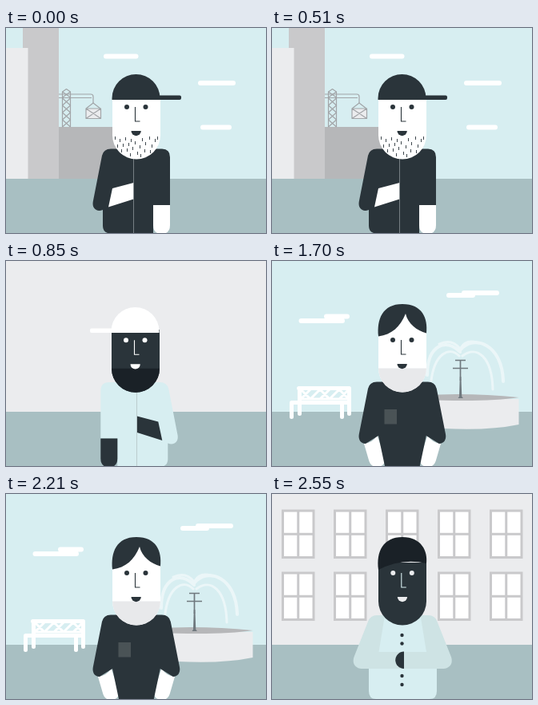
An HTML page for the animation above (3400 ms loop, 325 by 257 pixels).

```html
<!DOCTYPE html>
<html lang="en">
<head>
<meta charset="utf-8">
<title>Townspeople</title>
<style>
  html, body { margin: 0; width: 100%; height: 100%; overflow: hidden; background: #d7eef1; }
  svg { display: block; width: 100%; height: 100%; }

  .scene { visibility: hidden; animation: show 3.4s step-end infinite; }
  .scene:nth-of-type(2) { animation-delay: -2.55s; }
  .scene:nth-of-type(3) { animation-delay: -1.7s; }
  .scene:nth-of-type(4) { animation-delay: -.85s; }
  @keyframes show {
    0% { visibility: visible; }
    25%, 100% { visibility: hidden; }
  }

  .sky { fill: #d7eef1; }
  .wall { fill: #ebecee; }
  .ground { fill: #a8bfc2; }
  .dark { fill: #2a343a; }
  .black { fill: #1a2127; }
  .white { fill: #fff; }
  .grey { fill: #c9c9cb; }
  .shade { fill: #b6b7b9; }
  .sleeve { fill: #cee3e4; }
  .line { fill: none; stroke-linejoin: round; }
  .cloud { fill: none; stroke: #fff; stroke-width: 6; stroke-linecap: round; }
</style>
</head>
<body>
<svg viewBox="0 0 325 257" preserveAspectRatio="none">
  <defs>
    <path id="head" d="M133 86H193V134.500A30 30 0 0 1 133 134.500Z"/>
    <path id="beard" d="M133 134.500H193A30 30 0 0 1 133 134.500Z"/>
    <g id="face">
      <circle cx="151" cy="99" r="3"/>
      <circle cx="174.500" cy="99" r="3"/>
      <path d="M156.500 129H168.800A6.150 6.150 0 0 1 156.500 129Z"/>
      <path class="line" d="M161.500 99V117H167.500" stroke="currentColor" stroke-width="1.100" style="stroke-linejoin:miter"/>
    </g>
    <g id="cap">
      <path d="M132.500 90V88A30 30 0 0 1 192.500 88V90Z"/>
      <rect x="180" y="84.500" width="39" height="5.500" rx="2"/>
    </g>
    <g id="jacket">
      <path d="M131 151.500H195Q205 151.500 205 162V222H184V257H127Q121 255 121 248V228C113 231 107.500 226 108.700 218L120 160Q122 151.500 131 151.500Z"/>
    </g>
    <path id="low-hand" d="M184 222H205V247Q205 258 194.500 258T184 247Z"/>
    <path id="tucked-hand" d="M133 201L159.500 194V214.500L128 224.500Z"/>
    <path id="half-sleeve" d="M163 151.500H131Q122 151.500 120 160L108.800 217C107.500 224 111 229 117 229L133 219L141 257H163Z"/>
    <path id="side-hand" d="M115 229Q126 228 131.500 218.500L140.500 246Q143 257 132 258Q123 259 120.500 248Z"/>
    <path id="folded-arm" d="M141 152H131Q123 152 120 160L103 203C99 213 105 219 113 219H163.500V198H133.500Z"/>
    <g id="window">
      <rect x="1.500" y="1.500" width="38.500" height="58.500" fill="#fff" stroke="#c9c9cb" stroke-width="3"/>
      <path d="M20.750 1V61M1 30.750H41" stroke="#c9c9cb" stroke-width="3"/>
    </g>
    <g id="window-row">
      <use href="#window"/>
      <use href="#window" x="65"/>
      <use href="#window" x="130"/>
      <use href="#window" x="195"/>
      <use href="#window" x="260"/>
    </g>
  </defs>

  <g class="scene">
    <rect class="sky" width="325" height="190"/>
    <rect class="grey" x="21" width="45" height="190"/>
    <rect class="wall" y="25" width="27.500" height="165"/>
    <rect class="shade" x="66" y="124" width="80" height="66"/>
    <rect class="ground" y="189" width="325" height="68"/>
    <g class="line" stroke="#a2a5a8" stroke-width="1.200">
      <path d="M70.500 124V80L75.500 76.500L80.500 80V124M66 83H106Q109 83 109 86V94M66 87.500H107"/>
      <path d="M70.500 88L80.500 97L70.500 106L80.500 115L70.500 124M80.500 88L70.500 97L80.500 106L70.500 115L80.500 124M70.500 80L80.500 87M80.500 80L70.500 87"/>
      <path d="M100 101L109 94L118 101"/>
      <path d="M100 101H118.500V113.500H100ZL118.500 113.500M118.500 101L100 113.500" fill="#ebecee"/>
    </g>
    <path class="cloud" d="M125 35.500H162.500M243 69H284M246 124.500H279"/>
    <use href="#jacket" class="dark"/>
    <use href="#tucked-hand" class="white"/>
    <use href="#low-hand" class="white"/>
    <path d="M159.500 163V257" stroke="#8b9497" stroke-width=".8"/>
    <use href="#head" class="white"/>
    <path class="line" stroke="#2a343a" stroke-width=".9" d="M136.500 136v4M142.500 139v4M149.500 137v4M156.500 139v4M170.500 138v4M179.500 136v4M186.500 139v4M139.500 146v4M146.500 145v4M153.500 144v4M161.500 142v4M167.500 147v4M174.500 143v4M182.500 146v4M189.500 136v4M144.500 152v4M151.500 151v4M158.500 149v4M164.500 155v4M173.500 152v4M180.500 153v4M155.500 157v4M168.500 158v4"/>
    <use href="#face" class="dark" color="#2a343a"/>
    <use href="#cap" class="dark"/>
  </g>

  <g class="scene">
    <rect class="wall" width="325" height="190"/>
    <rect class="ground" y="189" width="325" height="68"/>
    <g transform="matrix(-1 0 0 1 323.300 .5)">
      <use href="#jacket" class="sky"/>
      <use href="#tucked-hand" class="dark"/>
      <use href="#low-hand" class="dark"/>
      <path d="M159.800 163V257" stroke="#b3c3c6" stroke-width=".8"/>
    </g>
    <g transform="translate(-1 .3)">
      <use href="#head" class="dark"/>
      <use href="#beard" class="black"/>
      <use href="#face" class="white" color="#fff"/>
    </g>
    <use href="#cap" class="white" transform="matrix(-1 0 0 1 324 0)"/>
  </g>

  <g class="scene">
    <rect class="sky" width="325" height="190"/>
    <rect class="ground" y="189" width="325" height="68"/>
    <path class="cloud" d="M36.500 75H88M68 69.500H94M221 43H251M240 40H281"/>
    <g class="line" stroke="#fff" stroke-linecap="round">
      <path stroke-width="5" d="M33.500 159.500H96.500M34.500 160V191.500M96.500 160V191.500M24.500 177.500H96M24.500 178V195.500M87.500 178V195.500"/>
      <path stroke-width="3" d="M35 173H96M36 161L48 173L60 161L72 173L84 161L96 173M48 161L36 173M72 161L60 173M96 161L84 173"/>
    </g>
    <path class="wall" d="M165 173H308.500V205Q270 213 215 210L165 207Z"/>
    <path class="shade" d="M165 170Q235 163.500 308.500 171Q270 177 190 174Z"/>
    <g class="line" stroke="#fff" stroke-linecap="round" opacity=".5">
      <path stroke-width="4" d="M235 114C218 96 194 105 194 143M235 112C252 91 288 104 289 151"/>
      <path stroke-width="3" d="M234 119C221 106 203 117 199 150M238 119C256 105 275 120 276 161M235 110Q225 97 209 104M236 109Q242 98 256 102"/>
    </g>
    <path class="line" stroke="#6f787e" stroke-width="1.700" d="M229 124.500H242M226 134.500H245M235.500 124V150"/>
    <path fill="#6f787e" d="M234.800 145H236.400L237.300 170L239 172H232.500L234 170Z"/>
    <use href="#side-hand" class="white"/>
    <use href="#side-hand" class="white" transform="matrix(-1 0 0 1 326 0)"/>
    <use href="#half-sleeve" class="dark"/>
    <use href="#half-sleeve" class="dark" transform="matrix(-1 0 0 1 325.800 0)"/>
    <rect x="140.500" y="186" width="15.500" height="18.500" fill="#4a5356"/>
    <use href="#head" class="white"/>
    <path class="white" d="M134 90Q138 60 163 58T192 90Z"/>
    <use href="#beard" fill="#e8e9eb"/>
    <path class="dark" d="M133 94.500C131 73 138 54 163 54S195 72 193 90.500C181 87 170 79 167 66C160 83 150 92 133 94.500Z"/>
    <use href="#face" class="dark" color="#2a343a"/>
  </g>

  <g class="scene">
    <rect class="wall" width="325" height="190"/>
    <use href="#window-row" x="12" y="19.500"/>
    <use href="#window-row" x="12" y="97.500"/>
    <rect class="ground" y="189" width="325" height="68"/>
    <path class="sky" d="M131 152H196L206 190V247Q206 257 197 257H130Q121 257 121 247V190Z"/>
    <use href="#folded-arm" class="sleeve"/>
    <use href="#folded-arm" class="sleeve" transform="matrix(-1 0 0 1 326.500 0)"/>
    <path class="dark" d="M165 197.500A10.750 10.750 0 0 0 165 219Z"/>
    <g class="dark">
      <circle cx="162.500" cy="177" r="2.200"/>
      <circle cx="162.500" cy="187.500" r="2.200"/>
      <circle cx="162.500" cy="228" r="2.200"/>
      <circle cx="162.500" cy="239" r="2.200"/>
    </g>
    <use href="#head" class="dark"/>
    <path class="black" d="M133 95C130 72 139 54 163 54S195 72 193 87Q162 80 133 95Z"/>
    <use href="#face" fill="#ebecee" color="#d7eef1" x=".3"/>
  </g>
</svg>
</body>
</html>
```
